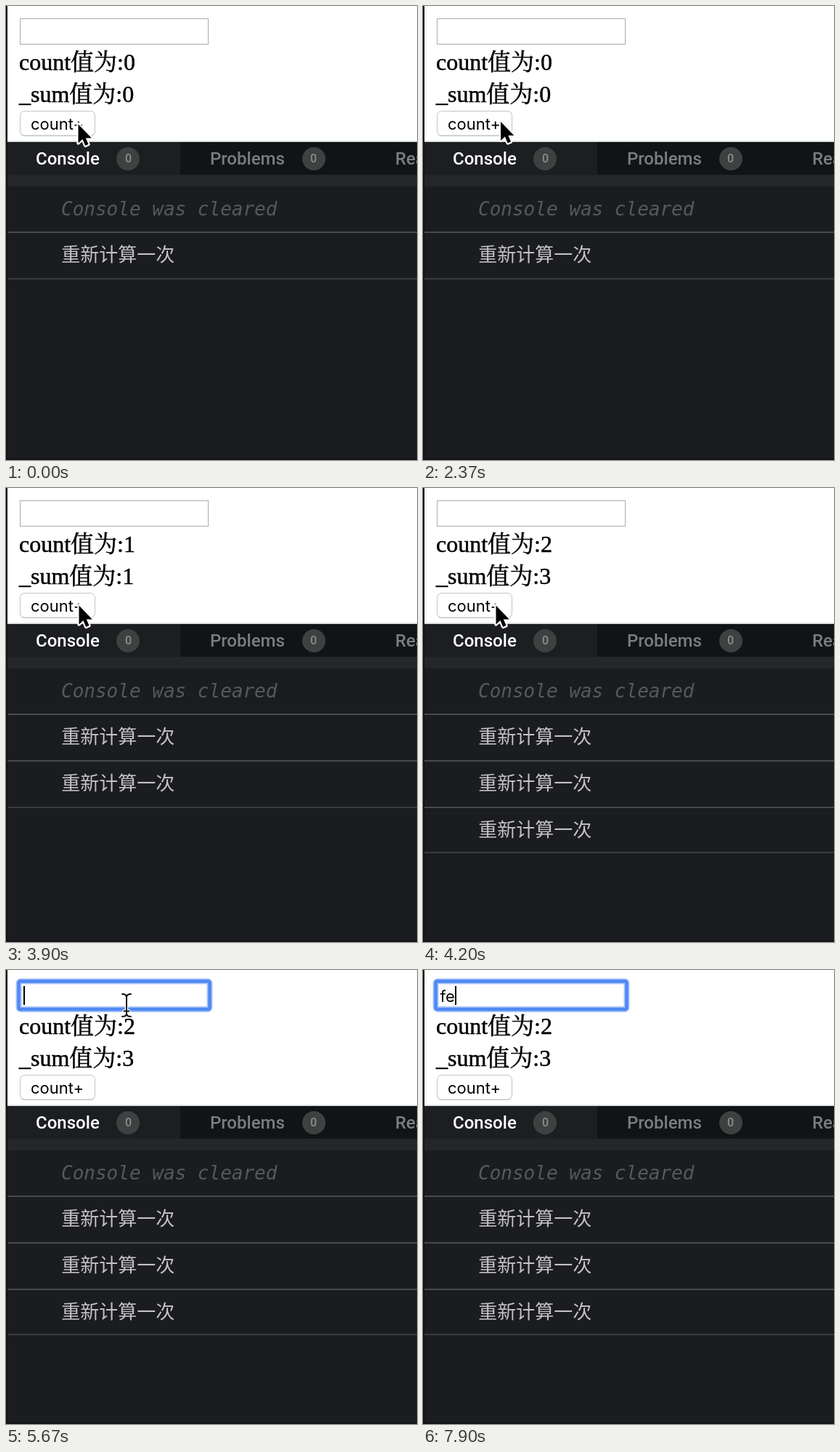
These frames come from a looping animation (566x624 px, 8000 ms). An HTML page:

```html
<!DOCTYPE html>
<html lang="zh">
<head>
<meta charset="utf-8">
<style>
html, body { margin: 0; width: 100%; height: 100%; overflow: hidden; background: #1b1c1f; }
svg { display: block; }
.page { font: 32px "Liberation Serif", "Noto Serif CJK SC", "Noto Sans CJK SC", "Noto Sans CJK", serif; stroke: #000; stroke-width: .5; }
.ui { font: 22px Inter, sans-serif; }
.tab { font: 500 24px Roboto, sans-serif; fill: #7c7d80; }
.badge { font: 500 16px Roboto, sans-serif; fill: #8b8d8e; text-anchor: middle; }
.cleared { font: italic 26px "DejaVu Sans Mono", monospace; fill: #57585b; }
.log { font: 26px "Noto Sans CJK SC", "Noto Sans CJK", sans-serif; fill: #c3c3c5; }
</style>
</head>
<body>
<svg width="566" height="624" viewBox="0 0 566 624">
  <rect width="566" height="187" fill="#fff"/>
  <rect y="185.5" width="566" height="1.5" fill="#cfd7d3"/>

  <rect x="19.5" y="17.5" width="259" height="35" fill="#fff" stroke="#acacac"/>
  <g id="ring" fill="none">
    <rect x="17.5" y="15.5" width="263" height="38.5" rx="3" stroke="#a9c6fa" stroke-width="8"/>
    <rect x="17.5" y="15.5" width="263" height="38.5" rx="2" stroke="#5089f3" stroke-width="4.5"/>
  </g>
  <text id="typed" class="ui" x="23.5" y="44"></text>
  <rect id="caret" y="22" width="2" height="26"/>

  <g class="page">
    <text id="count" x="18" y="88"></text>
    <text id="sum" x="18" y="132"></text>
  </g>
  <rect x="19.5" y="145.5" width="103" height="33.5" rx="6" fill="#c6c6c6"/>
  <rect x="19.5" y="144.5" width="103" height="33.5" rx="6" fill="#fff" stroke="#c4c4c4"/>
  <text class="ui" x="34" y="170">count+</text>

  <rect y="187" width="566" height="45" fill="#111317"/>
  <rect y="187" width="240" height="45" fill="#1c1e21"/>
  <rect y="232" width="566" height="16" fill="#242629"/>
  <text class="tab" x="41" y="218" style="fill:#fff">Console</text>
  <text class="tab" x="281" y="218">Problems</text>
  <text class="tab" x="536" y="218">React</text>
  <g fill="#3e4140"><circle cx="168" cy="210" r="16"/><circle cx="424" cy="210" r="16"/></g>
  <text class="badge" x="168.5" y="215">0</text>
  <text class="badge" x="423.5" y="215">0</text>

  <text class="cleared" x="76" y="288">Console was cleared</text>
  <rect x="2" y="310" width="564" height="2" fill="#48494c"/>
  <g id="logs"></g>
  <rect width="2" height="624" fill="#111215"/>
  <rect y="622" width="566" height="2" fill="#131417"/>

  <path id="arrow" d="M0 0V26L5.9 20.5L9.7 29.4L14 27.6L10.3 19H18.3Z"
    stroke="#fff" stroke-width="4.4" stroke-linejoin="round" paint-order="stroke"/>
  <g id="beam" fill="none" stroke-linecap="round">
    <path id="beamPath" stroke="#fff" stroke-width="4.5"
      d="M-6 -15.5Q0 -15.5 0 -11Q0 -15.5 6 -15.5M0 -11V11M-6 15.5Q0 15.5 0 11Q0 15.5 6 15.5M-3.5 8H3.5"/>
  </g>
</svg>
<script>
const $ = id => document.getElementById(id);
const show = (id, on) => $(id).setAttribute('visibility', on ? 'visible' : 'hidden');

// dark core drawn over the pale halo
const ink = $('beamPath').cloneNode();
ink.id = 'beamInk';
ink.setAttribute('stroke', '#111');
ink.setAttribute('stroke-width', 2);
$('beam').append(ink);

// pointer keys: time, x, y
const path = [
  [0, 99.5, 162.5], [2100, 99.5, 162.5], [2240, 104, 160], [2340, 107, 159],
  [2400, 107, 159], [2500, 100.5, 161.5],
  [4570, 100.5, 161.5], [4680, 109, 150], [4800, 138, 112], [4930, 159, 71],
  [5060, 175, 58], [5180, 171, 51], [5300, 166, 48.5],
  [5670, 166, 48.5], [6300, 166, 50], [8000, 166, 50]
];

function pointer(t) {
  const i = path.findIndex(k => k[0] > t);
  const [t0, x0, y0] = path[i - 1], [t1, x1, y1] = path[i];
  const p = (t - t0) / (t1 - t0);
  return [x0 + (x1 - x0) * p, y0 + (y1 - y0) * p];
}

function logRows(n) {
  let rows = '';
  for (let i = 0; i < n; i++) {
    const last = i === n - 1;
    const y = i === 2 ? 500 : 374 + 64 * i;
    rows += `<text class="log" x="76.3" y="${350.5 + 64 * i}">重新计算一次</text>
      <rect x="2" y="${y}" width="564" height="2" fill="${last ? '#3a3b3e' : '#48494c'}"/>`;
  }
  return rows;
}

let shownRows = 0;
function draw(t) {
  const clicks = (t >= 2870) + (t >= 4030);
  $('count').textContent = 'count值为:' + clicks;
  $('sum').textContent = '_sum值为:' + [0, 1, 3][clicks];
  const rows = 1 + (t >= 2900) + (t >= 4060);
  if (rows !== shownRows) $('logs').innerHTML = logRows(shownRows = rows);

  const chars = (t >= 7330) + (t >= 7870);
  const keyTime = [5670, 7330, 7870][chars];
  $('typed').textContent = 'fe'.slice(0, chars);
  $('caret').setAttribute('x', [24, 30.5, 44][chars]);
  show('ring', t >= 5670);
  show('caret', t >= 5670 && Math.floor((t - keyTime) / 500) % 2 === 0);

  const [x, y] = pointer(t), beam = y < 140;
  show('arrow', !beam);
  show('beam', beam);
  $(beam ? 'beam' : 'arrow').setAttribute('transform', `translate(${x} ${y})`);
  $('beam').setAttribute('opacity', Math.max(0, Math.min(1, (7370 - t) / 170)));
}

function tick(now) {
  draw(now % 8000);
  requestAnimationFrame(tick);
}
draw(0);
requestAnimationFrame(tick);
</script>
</body>
</html>
```
